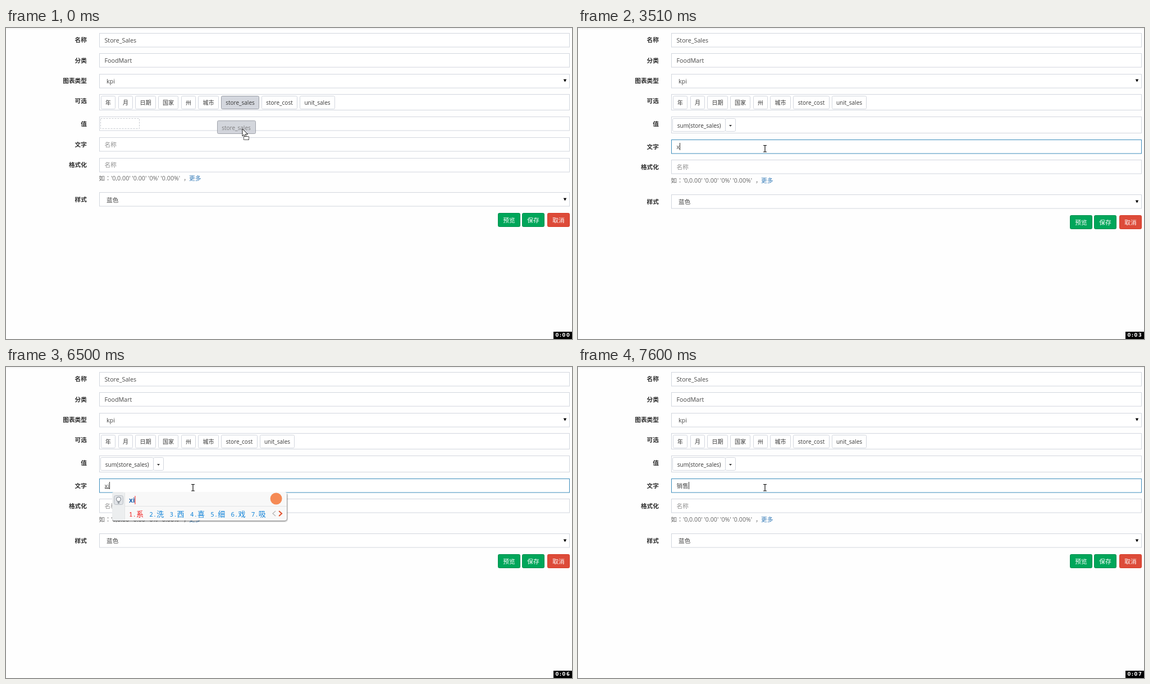
Write an HTML page that moves like this. It is 1008x555 px and loops after 8 s.

```html
<!DOCTYPE html>
<html lang="zh-CN">
<head>
<meta charset="utf-8">
<title>KPI form</title>
<style>
html, body { margin: 0; width: 100%; height: 100%; overflow: hidden; background: #fefefe; }
svg { display: block; font: 10.7px "Open Sans", "Noto Sans CJK SC", "Noto Sans CJK", sans-serif; fill: #484848; }
.label { font-weight: 700; fill: #2c2c2c; text-anchor: end; }
.chip { font-size: 10px; text-anchor: middle; fill: #383838; }
.button { fill: #fff; text-anchor: middle; font-weight: 500; }
.hint { fill: #666; }
.link { fill: #337ab7; }
.empty { fill: #909090; }
.clock { font: bold 8.4px "DejaVu Sans", sans-serif; fill: #fff; text-anchor: middle; }
.pinyin { font: bold 12.5px "Liberation Sans", sans-serif; fill: #1258a8; }
.digit { font: 10.9px "Noto Sans Mono", monospace; }
.word { font-size: 13px; }
</style>
</head>
<body>
<svg id="stage" width="1008" height="555" viewBox="0 0 1008 555"></svg>
<script>
const LOOP = 8000;
const stage = document.getElementById('stage');
const pen = document.createElement('canvas').getContext('2d');
const family = '"Open Sans", "Noto Sans CJK SC", "Noto Sans CJK", sans-serif';

const ticks = [1040, 2020, 3080, 4070, 5040, 6090, 7170];

// time, typed text, caret visible
const typing = [
  [1470, '', 1], [1900, '', 0], [2390, '', 1], [2980, '', 0],
  [3080, 'xi', 1], [3510, 'x', 1], [3660, '', 1],
  [4340, 'x', 1], [4490, 'xia', 1], [4610, 'xiao', 1],
  [5040, 'xiao', 0], [5150, 'xia', 1], [5270, 'xi', 1], [5380, 'x', 1],
  [5530, '', 1], [6230, '', 0],
  [6350, 'x', 1], [6500, 'xi', 1], [6620, 'xia', 1], [6740, 'xiao', 1],
  [6890, 'xiaosh', 1], [7450, 'xiaoshou', 1], [7600, '销售', 1]
];

// time, pinyin, candidates, text that sets the panel's place
const inputs = [
  [6350, 'x', '想 下 小 向 新 先 写', 'x'],
  [6500, 'xi', '系 洗 西 喜 细 戏 吸', 'xi'],
  [6620, 'xia', '下 夏 吓 虾 瞎 侠 峡', 'xia'],
  [6740, "xiao's", '小时 销售 小数 小说 消失 小事 笑死', 'xiao'],
  [6890, "xiao'sho", '销售 小手 消瘦 小受 销售额 小首 小寿', 'xiaosh'],
  [7450, "xiao'shou", '销售 小手 消瘦 小受 销售额 小首 小寿', 'xiaosh'],
  [7600]
];

const latest = (list, t) => list.filter(e => e[0] <= t).pop();

function measure(s, font = '10.7px ' + family) {
  pen.font = font;
  return pen.measureText(s).width;
}

const text = (x, mid, s, cls = '') => `<text x="${x}" y="${mid + 4}" class="${cls}">${s}</text>`;
const box = (x, y, w, h, fill = '#fff', stroke = '#d2d6de', more = '') =>
  `<rect x="${x + .5}" y="${y + .5}" width="${w - 1}" height="${h - 1}" fill="${fill}" stroke="${stroke}" ${more}/>`;
const path = (d, more) => `<path d="${d}" ${more}/>`;
const field = (y, h = 25.5, stroke) => box(166, y, 838, h, '#fff', stroke);
const arrowDown = y => path(`M992.7 ${y - 2.5}h5.6l-2.8 5z`, 'fill="#000"');

function chip(x, w, s, on) {
  return box(x, 121, w, 24, on ? '#d4d7de' : '#fff', on ? '#999da6' : '#d2d6de', 'rx="2"') +
    text(x + w / 2, 133, s, 'chip');
}

function button(x, y, s, fill, stroke) {
  return box(x, y, 40, 25, fill, stroke, 'rx="2"') + text(x + 20, y + 12.5, s, 'button');
}

function chips(dropped) {
  const list = [[169, 26, '年'], [200, 26, '月'], [230, 37, '日期'], [271, 36, '国家'], [312, 26, '州'], [342, 37, '城市']];
  if (dropped) list.push([383, 65, 'store_cost'], [452, 62, 'unit_sales']);
  else list.push([383, 68, 'store_sales', true], [455, 64, 'store_cost'], [523, 63, 'unit_sales']);
  return list.map(c => chip(...c)).join('');
}

function valueRow(dropped) {
  if (!dropped) {
    return field(158) + box(168, 161, 70, 19, 'none', '#c6cad0', 'stroke-dasharray="3 2"');
  }
  return field(158, 30) + box(168, 161, 95, 24, '#fff', '#d2d6de', 'rx="2"') +
    box(262, 161, 19, 24, '#fff', '#d2d6de', 'rx="2"') +
    text(215.7, 173.5, 'sum(store_sales)', 'chip') + path('M269 173h5l-2.5 3z', 'fill="#333"');
}

function typedField(y, mid, t) {
  const state = latest(typing, t);
  const [, typed, caret] = state || [0, '', 0];
  let out = field(y, 25.5, state ? '#3c8dbc' : undefined) +
    (typed ? text(175.5, mid, typed) : text(175.5, mid, '名称', 'empty'));
  const end = Math.round(175.5 + measure(typed)) + .5;
  if (t >= 6350 && t < 7600) out += path(`M176 216.5H${end}`, 'stroke="#444"');
  if (caret) out += path(`M${end} 205V218`, 'stroke="#333"');
  return out;
}

function panel(t) {
  const [, pinyin, words, anchor] = latest(inputs, t) || [];
  if (!pinyin) return '';
  let x = 30, items = '';
  words.split(' ').forEach((word, i) => {
    items += `<g fill="${i ? '#0f82d8' : '#f01818'}">` +
      `<text x="${x}" y="267" class="digit">${i + 1}.</text>` +
      `<text x="${x + 13}" y="267" class="word">${word}</text></g>`;
    x += 23.3 + 13 * word.length;
  });
  const w = x + 27;
  const end = 30 + measure(pinyin, 'bold 12.5px "Liberation Sans", sans-serif');
  const left = Math.round(175.5 + measure(anchor)) + 5;
  return `<g transform="translate(${left} 0)">` +
    `<rect x="0" y="224" width="${w + 2}" height="53" rx="5" fill="#000" opacity=".12"/>` +
    `<rect x="0" y="224" width="${w + 1}" height="51.5" rx="5" fill="#000" opacity=".3"/>` +
    `<rect y="223" width="${w}" height="51" rx="4" fill="#f8f8f8"/>` +
    `<rect y="223" width="22" height="51" rx="4" fill="#eceeef"/>` +
    path(`M22.5 224V273M23 248.5H${w}`, 'stroke="#e2e4e5"') +
    box(3, 229, 17, 17, '#dfe2e6', '#b8bdc3', 'rx="3"') +
    `<circle cx="11.5" cy="236" r="4" fill="#fff" stroke="#727982"/>` +
    path('M9.5 241h4M10 243h3', 'stroke="#5d646c"') +
    `<text x="30" y="242" class="pinyin">${pinyin}</text>` +
    path(`M${end + .5} 230V245`, 'stroke="#f01818"') + items +
    `<circle cx="${w - 19}" cy="235" r="10.5" fill="#f58a55"/>` +
    path(`M${w - 20} 257l-5 4.5 5 4.5`, 'fill="none" stroke="#bbb" stroke-width="1.5"') +
    path(`M${w - 14} 257l5 4.5-5 4.5`, 'fill="none" stroke="#e2502c" stroke-width="2"') + '</g>';
}

function pointer(t) {
  if (t < 940) {
    return path('M421 180v13l3-2.7 2.2 5 2.2-1-2.2-4.8h4.3z', 'fill="#fff" stroke="#000" stroke-width=".9"') +
      (t < 560 ? box(423, 193, 10, 7, '#fff', '#222', 'stroke-dasharray="2 .6"') : '');
  }
  const [x, y] = t < 1190 ? [367, 203] : [333, 215];
  return path(`M${x - 3} ${y - 5.5}h2.5l.5 .7 .5-.7h2.5M${x} ${y - 5}v10.5M${x - 3} ${y + 6}h2.5l.5-.7 .5 .7h2.5`,
    'fill="none" stroke="#111" stroke-width="1.2"');
}

function clock(t) {
  const n = ticks.filter(k => k <= t).length;
  return `<rect x="975" y="542" width="33" height="13" fill="#000"/>` +
    `<text x="981.5 987.5 993.5 1001" y="551" class="clock">0:0${n}</text>`;
}

function draw(t) {
  const dropped = t >= 560;
  const shift = dropped ? 3.6 : 0;
  const at = y => Math.round(y + shift);
  const labels = [[21, '名称'], [57.5, '分类'], [94, '图表类型'], [130, '可选'], [171, '值'],
    [208 + shift, '文字'], [244 + shift, '格式化'], [306 + shift, '样式']];
  const hint = 268 + shift;
  return path('M0 1H1008', 'stroke="#ececec"') +
    labels.map(([y, s]) => text(144, y, s, 'label')).join('') +
    field(9) + text(175.5, 21.5, 'Store_Sales') +
    field(45) + text(175.5, 58, 'FoodMart') +
    field(82) + text(179, 94.5, 'kpi') + arrowDown(94) +
    field(118, 29) + chips(dropped) + valueRow(dropped) +
    typedField(at(195.3), 208 + shift, t) +
    field(at(231.8)) + text(175.5, 244 + shift, '名称', 'empty') +
    // the Taiwan locale centres the wide colon
    `<g lang="zh-TW">${text(165.5, hint, '如：', 'hint')}</g>` +
    text(187, hint, "'0,0.00' '0.00' '0%' '0.00%'", 'hint') +
    text(316, hint, '，', 'hint') + text(326, hint, '更多', 'link') +
    field(at(293.4)) + text(179, 306.7 + shift, '蓝色') + arrowDown(at(306.4)) +
    button(876, at(330), '预览', '#00a65a', '#008d4c') +
    button(919, at(330), '保存', '#00a65a', '#008d4c') +
    button(964, at(330), '取消', '#dd4b39', '#d73925') +
    (dropped ? '' : '<g opacity=".8">' + box(376, 165, 69, 24, '#c9ccd4', '#888c95', 'rx="2"') +
      '<g opacity=".75">' + text(410, 178, 'store_sales', 'chip') + '</g></g>') +
    panel(t) + pointer(t) + clock(t);
}

let shown = '';
const start = performance.now();
function frame() {
  const next = draw((performance.now() - start) % LOOP);
  if (next !== shown) stage.innerHTML = shown = next;
  requestAnimationFrame(frame);
}
frame();
</script>
</body>
</html>
```
